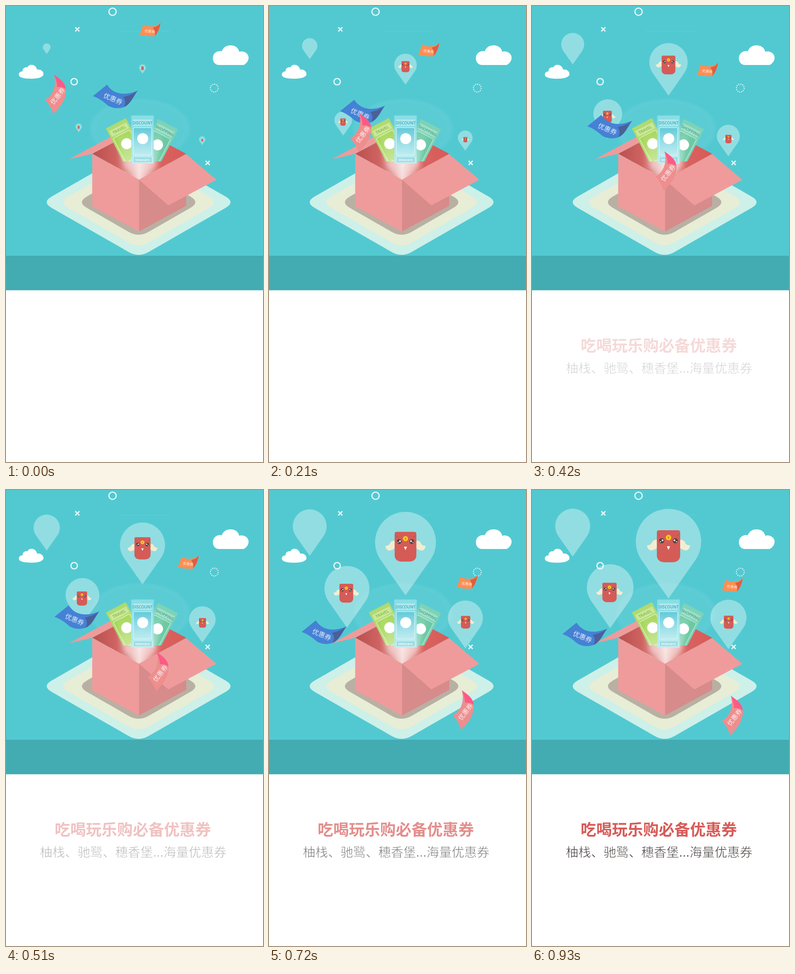
An HTML page for the animation above (1200 ms loop, 562 by 997 pixels).

```html
<!DOCTYPE html>
<html lang="zh">
<head>
<meta charset="utf-8">
<title>Coupon box</title>
<style>
  html, body { margin: 0; width: 100%; height: 100%; overflow: hidden; background: #fff; }
  svg { display: block; width: 100%; height: 100%; }
  text { text-anchor: middle; font-family: "Noto Sans CJK SC", "Noto Sans CJK", sans-serif; }
  .label { font-family: "Open Sans", "Noto Sans", sans-serif; }
  .coupon text { fill: #fff; fill-opacity: .86; font-weight: 300; }
</style>
</head>
<body>
<svg viewBox="0 0 562 997" preserveAspectRatio="none">
  <defs>
    <radialGradient id="glow">
      <stop offset="0" stop-color="#fff" stop-opacity=".1"/>
      <stop offset=".6" stop-color="#fff" stop-opacity=".05"/>
      <stop offset=".92" stop-color="#fff" stop-opacity=".065"/>
      <stop offset="1" stop-color="#fff" stop-opacity="0"/>
    </radialGradient>
    <linearGradient id="inside">
      <stop offset="0" stop-color="#b9504e"/>
      <stop offset=".25" stop-color="#cf6361"/>
      <stop offset=".42" stop-color="#e6a5a2"/>
      <stop offset=".5" stop-color="#f3d3d1"/>
      <stop offset=".58" stop-color="#eaaba8"/>
      <stop offset=".74" stop-color="#d96260"/>
      <stop offset="1" stop-color="#d95a56"/>
    </linearGradient>
    <linearGradient id="bluePanel" x2="0" y2="1">
      <stop offset="0" stop-color="#5fc8d8"/>
      <stop offset="1" stop-color="#9ce2ea"/>
    </linearGradient>
    <linearGradient id="beam" x2="0" y2="1">
      <stop offset="0" stop-color="#fff" stop-opacity="0"/>
      <stop offset=".7" stop-color="#fff" stop-opacity=".45"/>
      <stop offset="1" stop-color="#fff" stop-opacity=".2"/>
    </linearGradient>
    <filter id="soft"><feGaussianBlur stdDeviation="5"/></filter>
    <clipPath id="boxMouth"><rect width="562" height="340"/></clipPath>
    <path id="drop" d="M0 0L-.409 -.582A.5 .5 0 1 1 .409 -.582Z" fill="#fff" fill-opacity=".36"/>
    <path id="wing" fill="#f2edd0" d="M-23 -13C-28 -15 -33 -14 -36 -9C-37 -4 -42 -2 -47 -2C-47 4 -43 8 -39 9C-33 9 -27 6 -24 2Z"/>
    <g id="eye">
      <circle cx="-15" cy="-12" r="5.600" fill="#55403f"/>
      <circle cx="-13" cy="-13" r="2" fill="#fff"/>
      <circle cx="-17.500" cy="-10" r="1.200" fill="#fff"/>
      <path d="M-24 -27L-18 -22" stroke="#b54845" fill="none"/>
    </g>
    <g id="bird">
      <use href="#wing"/><use href="#wing" transform="scale(-1 1)"/>
      <path fill="#d55b57" d="M-21 -35H21Q25.500 -35 25.500 -30V20C25.500 30 18 35 8 35H-8C-18 35 -25.500 30 -25.500 20V-30Q-25.500 -35 -21 -35Z"/>
      <use href="#eye"/><use href="#eye" transform="scale(-1 1)"/>
      <circle cy="-19" r="6" fill="#f7cf1d"/>
      <path d="M-2 -22L0 -19L2 -22M0 -19V-15.500M-2 -18.500H2" stroke="#c8761c" fill="none"/>
      <path d="M-3.700 0H3.500L0 8Z" fill="#fff"/>
    </g>
  </defs>

  <rect width="562" height="997" fill="#fff"/>
  <rect width="562" height="546" fill="#52c9d1"/>
  <rect y="546" width="562" height="75.500" fill="#43abb2"/>
  <path d="M248 55.500H360" stroke="#7cc9c4" stroke-opacity=".5"/>

  <g fill="none" stroke="#e2f7f8" stroke-width="2.700">
    <circle cx="233" cy="12.500" r="8"/>
    <circle cx="149" cy="165.500" r="7"/>
    <path d="M151.500 46.500l9 9m0 -9l-9 9M436.500 338.500l9 9m0 -9l-9 9"/>
    <circle cx="455.500" cy="179.500" r="8.600" stroke-width="2.200" pathLength="24" stroke-dasharray="1 1"/>
  </g>
  <g fill="#fff">
    <path d="M462 128.500C455 126 452 120 452.500 113C453 103 462 97 472 99C475 90 482 86 491 86C501 86 508 91 510 100C519 97 530 103 530.500 112C531 120 525 126 520 129H466Z"/>
    <path d="M28 150C28 146 31 143 36 143C36 136 42 133 47 134C50 126 65 126 68 139C76 138 82 143 82 149C82 155 72 159 55 159C38 159 28 156 28 150Z"/>
  </g>

  <ellipse cx="293" cy="269" rx="113" ry="68" fill="url(#glow)"/>
  <g id="platform"></g>
  <path d="M138 335L240 280L291 269L189 323Z" fill="#ef9b9b"/>
  <path d="M189 323L291 269L394 323L291 380Z" fill="url(#inside)"/>
  <g id="tickets"></g>
  <path d="M291 382L258 352L236 262H348L326 352Z" fill="url(#beam)" filter="url(#soft)"/>
  <path d="M188.500 323L291 380V493L188.500 438Z" fill="#ef9b9b"/>
  <path d="M291 380L394 323V437L291 493Z" fill="#d78b8b"/>
  <path d="M291 380L394 324L460 380L355 436Z" fill="#ef9b9b"/>

  <g id="pins"></g>

  <g class="coupon" id="orange">
    <path fill="#fd8f54" d="M300 40C311 46 326 47 338 37C336 48 333 58 325 66C314 67 303 65 292 63C296 55 298 47 300 40Z"/>
    <path fill="#df5e42" d="M338 37C333 43 328 46 321 47C326 53 327 60 325 66C333 58 336 47 338 37Z"/>
    <text transform="translate(314.500 55.500) rotate(7)" y="2.800" font-size="7.700">优惠券</text>
  </g>
  <g class="coupon" id="blue">
    <path fill="#4581d5" d="M190 197L221 172C232 190 255 199 288 185C280 196 274 212 262 219C250 226 232 224 222 217C212 208 202 201 190 197Z"/>
    <path fill="#4b6097" d="M288 185C276 194 268 196 256 199C262 205 262 213 258 221C274 213 278 196 288 185Z"/>
    <text transform="translate(234 203) rotate(23)" y="5.300" font-size="14.500">优惠券</text>
  </g>
  <g class="coupon" id="red">
    <path fill="#ee8e8e" d="M85 205C100 197 112 178 105 150C118 160 130 170 131 184C132 205 116 225 103 236C100 224 92 212 85 205Z"/>
    <path fill="#fb5b86" d="M105 150C119 160 130 168 131 182C126 178 120 176 112 177C112 168 109 160 105 150Z"/>
    <text transform="translate(113 197) rotate(-52)" y="5" font-size="14">优惠券</text>
  </g>

  <g id="caption">
    <text x="277.200" y="755" font-size="34.200" font-weight="700" fill="#d75b57">吃喝玩乐购必备优惠券</text>
    <!-- the white outline thins the strokes -->
    <text x="278" y="801.500" font-size="27.500" font-weight="300" fill="#4b4644" stroke="#fff" stroke-width=".6">柚栈、驰鹭、穗香堡...海量优惠券</text>
  </g>
</svg>
<script>
const LOOP = 1200, STEP = 30;
const $ = id => document.getElementById(id);
const mix = (a, b, p) => a + (b - a) * p;
const progress = (t, from, to) => Math.min(1, Math.max(0, (t - from) / (to - from)));

// Rhombus with rounded corners, half width w, centred on the box
function rhombus(w, fill) {
  const cx = 290, cy = 429, k = 0.572, c = 22;
  const near = w - c, h = w * k, e = c * k;
  return `<path fill="${fill}" d="M${cx - near} ${cy - e}Q${cx - w} ${cy} ${cx - near} ${cy + e}` +
    `L${cx - c} ${cy + h - e}Q${cx} ${cy + h} ${cx + c} ${cy + h - e}` +
    `L${cx + near} ${cy + e}Q${cx + w} ${cy} ${cx + near} ${cy - e}` +
    `L${cx + c} ${cy - h + e}Q${cx} ${cy - h} ${cx - c} ${cy - h + e}Z"/>`;
}
$('platform').innerHTML =
  rhombus(212, '#cdf0e9') + rhombus(176, '#e8edd6') + rhombus(135, '#b9b0a4');

function ticket(x, y, turn, label, size, c) {
  return `<g transform="translate(${x} ${y}) rotate(${turn})">
    <rect x="-24" width="48" height="104" fill="${c.body}" stroke="${c.body}" stroke-width="2" stroke-dasharray="2 1.5"/>
    <rect x="-21" y="8" width="42" height="14" fill="${c.light}" fill-opacity=".65"/>
    <text class="label" y="18.5" font-size="${size}" font-weight="600" fill="${c.ink}">${label}</text>
    <rect x="-20" y="26" width="40" height="60" rx="2" fill="${c.panel}" stroke="${c.light}" stroke-width="1.5"/>
    <circle cx="0.5" cy="50" r="12" fill="#fff"/>
    ${c.extra || ''}</g>`;
}
const nameTag = `<rect x="-20" y="90" width="41" height="12.5" rx="1" fill="#62c5d3" stroke="#c9f0f2"/>
  <text class="label" y="98.5" font-size="6.5" font-weight="600" fill="#fff">Velkoran's</text>`;
$('tickets').innerHTML = '<g clip-path="url(#boxMouth)">' +
  ticket(240.5, 257, -27.5, 'TRAVEL', 8.8, { body: '#b0da70', light: '#d9efac', panel: '#a2d552', ink: '#74b53a' }) +
  ticket(354, 259, 27.5, 'SHOPPING', 8.6, { body: '#7dd3b6', light: '#b2e6d3', panel: '#6cc9a4', ink: '#38a488' }) +
  '</g>' +
  ticket(298.5, 240, 0, 'DISCOUNT', 8.6, { body: '#8adee5', light: '#c3eff1', panel: 'url(#bluePanel)', ink: '#35a9be', extra: nameTag });

// from/to: tip x, tip y, width; bird: offset from the final tip and scale
const pins = [
  { from: [89, 105, 17], to: [89, 145.5, 76.5], end: 750 },
  { from: [298.5, 148, 15], to: [298.5, 237, 143], end: 780, bird: [0, -114, 1] },
  { from: [159, 276, 14], to: [171, 302, 102], end: 750, bird: [-1.5, -78, 0.61] },
  { from: [429, 304, 14], to: [429.5, 348, 79], end: 750, bird: [0.5, -59, 0.41] }
];
$('pins').innerHTML = pins.map(({ to, bird }) => `<g><use href="#drop" transform="scale(${to[2]})"/>` +
  (bird ? `<use href="#bird" transform="translate(${bird[0]} ${bird[1]}) scale(${bird[2]})"/>` : '') + '</g>').join('');
pins.forEach((pin, i) => { pin.node = $('pins').children[i]; });

const coupons = { orange: [123, 156], blue: [-123.5, 118], red: [330, 300] };

function draw(t) {
  for (const { from, to, end, node } of pins) {
    const p = progress(t, 0, end);
    const [x, y, w] = from.map((v, i) => mix(v, to[i], p));
    node.setAttribute('transform', `translate(${x} ${y}) scale(${w / to[2]})`);
  }
  const p = progress(t, 0, 750);
  for (const id in coupons) {
    const [dx, dy] = coupons[id];
    $(id).setAttribute('transform', `translate(${dx * p} ${dy * p})`);
  }
  $('caption').setAttribute('opacity', progress(t, 270, 930));
}

function tick() {
  const t = performance.now() % LOOP;
  draw(Math.floor(t / STEP) * STEP);
  requestAnimationFrame(tick);
}
tick();
</script>
</body>
</html>
```
